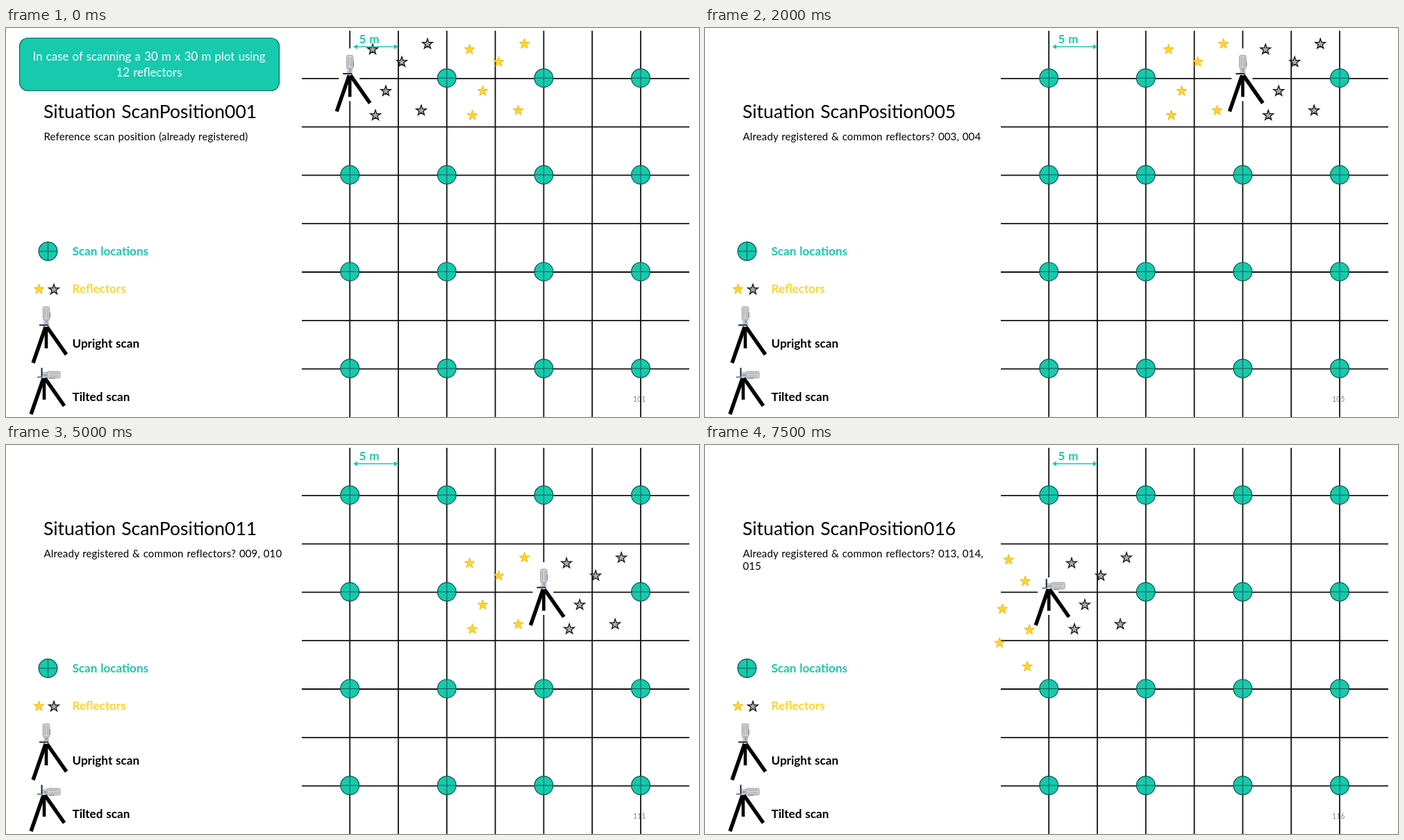
An HTML page for the animation above (8 s loop, 998 px wide and 561 px high).

```html
<!DOCTYPE html>
<html lang="en">
<head>
<meta charset="utf-8">
<title>Scan positions</title>
<style>
html, body { margin: 0; width: 100%; height: 100%; overflow: hidden; background: #fff; }
svg { display: block; width: 100vw; height: 100vh; font-family: Lato, Carlito, sans-serif; }
.title { font-size: 26.5px; word-spacing: 1.4px; }
.sub { font-size: 15px; letter-spacing: .14px; word-spacing: .8px; }
.bold { font-size: 17.1px; font-weight: bold; word-spacing: .7px; }
.banner { font-size: 16.8px; word-spacing: 1px; fill: #fff; text-anchor: middle; }
.page { font-size: 10.6px; fill: #898989; }
.teal { fill: #17c9ad; }
.gold { fill: #ffd42f; }
</style>
</head>
<body>
<svg viewBox="0 0 998 561">
  <defs>
    <g id="spot" stroke="#0b5a4e">
      <circle r="13.4" class="teal" stroke-width="1.2"/>
      <path d="M-13.4 0H13.4M0-13.4V13.4" stroke-width="1"/>
    </g>
    <path id="star"/>
    <g id="legs" stroke="#000" fill="none">
      <path d="M-1 1L-19 53M1 1L29 41" stroke-width="5.4"/>
      <path d="M0 1V32" stroke-width="4.6"/>
    </g>
    <g id="head">
      <rect x="-4" y="-10" width="8" height="9" fill="#bdcfe0"/>
      <rect x="-1" y="-8" width="3" height="4" fill="#8fa3b8"/>
      <rect x="-4.8" y="-28" width="9.6" height="19" rx="2" fill="#cfcfcf" stroke="#8d8d8d" stroke-width=".8"/>
      <path d="M-2-25V-12M2-25V-12" stroke="#a2a2a2"/>
      <path d="M5.2-20V-12" stroke="#777"/>
      <path d="M-10-1.5H3" stroke="#222" stroke-width="2"/>
    </g>
    <g id="upright">
      <rect x="-16" y="-38" width="30" height="76" fill="#fff"/>
      <use href="#legs"/><use href="#head"/>
    </g>
    <g id="tilted">
      <rect x="-16" y="-16" width="30" height="54" fill="#fff"/>
      <use href="#legs"/>
      <path d="M-10-.5H2" stroke="#777" stroke-width="2"/>
      <use href="#head" transform="translate(-5 -4) rotate(90)"/>
    </g>
  </defs>
  <text id="page" class="page" x="903" y="539"></text>
  <path id="grid" stroke="#111" stroke-width="1.8"/>
  <g id="scene"></g>
  <g stroke="#17c9ad" stroke-width="1.7">
    <path d="M503 27H562"/>
    <path d="M500 27l6-3.5v7zM565 27l-6-3.5v7z" class="teal" stroke="none"/>
  </g>
  <text class="bold teal" x="508.5" y="21.5">5 m</text>
  <g id="banner">
    <rect x="19.5" y="14.5" width="374" height="76" rx="12" class="teal" stroke="#0b6a5b" stroke-width="1.2"/>
    <text class="banner" x="206" y="47">In case of scanning a 30 m x 30 m plot using</text>
    <text class="banner" x="206" y="69.5">12 reflectors</text>
  </g>
  <text id="title" class="title" x="54" y="130"></text>
  <text id="sub" class="sub" x="54.5" y="161.5"></text>
  <text id="sub2" class="sub" x="54.5" y="179.5"></text>
  <g id="legend"></g>
  <text class="bold teal" x="95.5" y="327.5">Scan locations</text>
  <text class="bold gold" x="95.5" y="382">Reflectors</text>
  <text class="bold" x="95.5" y="461">Upright scan</text>
  <text class="bold" x="95.5" y="538">Tilted scan</text>
</svg>
<script>
const $ = id => document.getElementById(id);
const SLIDES = 16, HOLD = 500, SIDE = 4, CELL = 69.8, LEFT = 495.2, TOP = 72.8;

// Star layouts: between two stations, and in the strip outside the plot
const inner = [[-37, -42], [42, -50], [5, -24], [-18, 18], [-33, 53], [33, 46]];
const outer = [[12, -75], [-12, -44], [21, -4], [-18, 26], [25, 45], [-15, 79]];

const use = (id, x, y, extra = '') => `<use href="#${id}" x="${x}" y="${y}" ${extra}/>`;
const star = (x, y, isGold) => use('star', x, y, isGold
  ? 'fill="#ffd42f" stroke="#efb91c" stroke-width="1"'
  : 'fill="#ababab" stroke="#151515" stroke-width="1.3"');
const code = n => String(n).padStart(3, '0');

// Stations follow the rows in alternating directions
function station(i) {
  const row = Math.floor(i / SIDE), step = i % SIDE;
  const col = row % 2 ? SIDE - 1 - step : step;
  return { x: LEFT + col * 2 * CELL, y: TOP - .6 + row * 2 * CELL, dir: row % 2 ? -1 : 1 };
}

// Each station has the reflectors ahead of it; the last in a row looks outside
function reflectors(i) {
  const { x, y, dir } = station(i);
  const outside = i % SIDE === SIDE - 1;
  return outside
    ? outer.map(([dx, dy]) => star(x + dir * (46 + dx), y + 28 + dy, true))
    : inner.map(([dx, dy]) => star(x + dir * CELL + dx, y + dy, i % 2));
}

$('star').setAttribute('d', 'M' + Array.from({ length: 10 }, (_, i) => {
  const r = i % 2 ? 3.1 : 7.8, a = i * Math.PI / 5;
  return `${(r * Math.sin(a)).toFixed(2)} ${(.8 - r * Math.cos(a)).toFixed(2)}`;
}).join('L') + 'z');

let lines = '';
for (let i = 0; i < 7; i++) {
  lines += `M${LEFT + i * CELL} 4V561M426 ${TOP + i * CELL}H984`;
}
$('grid').setAttribute('d', lines);

$('legend').innerHTML = use('spot', 60.5, 322) + star(47.5, 376, true) +
  star(69, 376.5, false) + use('upright', 58, 430) + use('tilted', 55, 504);

function show(slide) {
  const n = slide + 1, here = slide >> 1;
  let scene = '';
  for (let i = 0; i < SIDE * SIDE; i++) {
    const { x, y } = station(i);
    scene += i === here ? use(slide % 2 ? 'tilted' : 'upright', x, y - 4.8) : use('spot', x, y);
  }
  const first = Math.max(0, here - 1);
  scene += [...reflectors(first), ...reflectors(first + 1)].join('');
  $('scene').innerHTML = scene;

  // The closing slide names three earlier scans, the third on its own line
  const last = n === SLIDES;
  const known = [n - 3, n - 2, n - 1].slice(last ? 0 : 1).filter(k => k > 0).map(code);
  $('title').textContent = 'Situation ScanPosition' + code(n);
  $('sub').textContent = slide
    ? 'Already registered & common reflectors? ' + known.slice(0, 2).join(', ') + (last ? ',' : '')
    : 'Reference scan position (already registered)';
  $('sub2').textContent = known[2] || '';
  $('page').textContent = 100 + n;
  $('banner').style.display = slide ? 'none' : '';
}

let current = -1;
const start = performance.now();
function tick() {
  const slide = Math.floor((performance.now() - start) / HOLD) % SLIDES;
  if (slide !== current) show(current = slide);
  requestAnimationFrame(tick);
}
tick();
</script>
</body>
</html>
```
